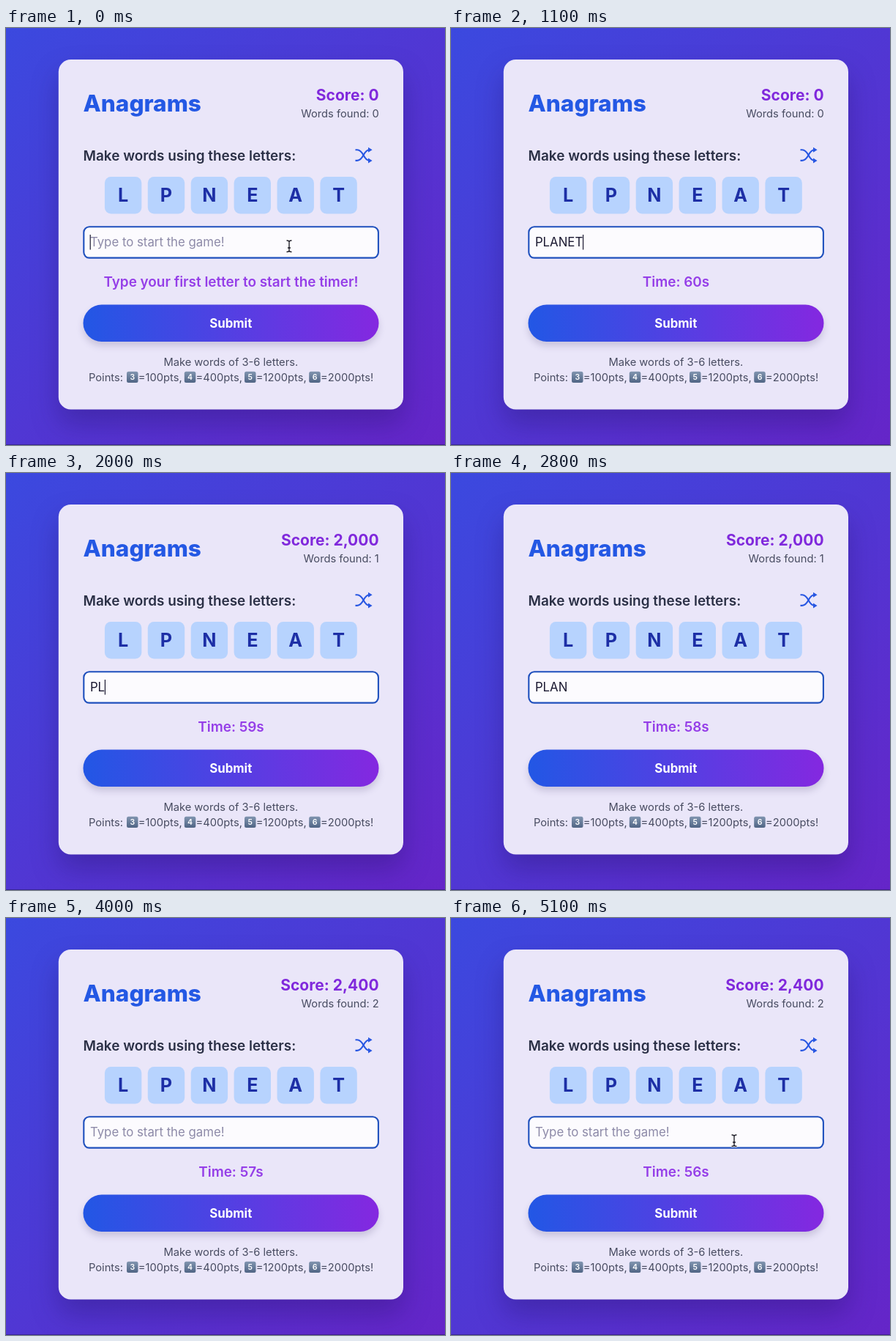
Recreate the animation shown at these times as an HTML page. Size 600 by 569 pixels, loop 5200 ms.

```html
<!DOCTYPE html>
<html lang="en">
<head>
<meta charset="utf-8">
<title>Anagrams</title>
<style>
  html, body { margin: 0; width: 100%; height: 100%; overflow: hidden; background: #4b37d3; }
  svg { display: block; width: 600px; height: 569px; font-family: Inter, sans-serif; }
  .card { filter: drop-shadow(0 20px 18px rgba(20, 5, 70, .26)); }
  .button { filter: drop-shadow(0 6px 5px rgba(30, 20, 80, .16)); }
  .mid { text-anchor: middle; }
  .end { text-anchor: end; }
  .small { font-size: 14.7px; fill: #484c61; }
  .score { font-size: 21px; font-weight: 700; fill: #8029dc; }
  .tile { font-size: 25.2px; font-weight: 700; fill: #1d2fa6; }
  .field { font-size: 16.8px; fill: #1a1830; }
</style>
</head>
<body>
<svg viewBox="0 0 600 569">
  <defs>
    <linearGradient id="page" x2="1" y2="1">
      <stop stop-color="#3b49df"/><stop offset="1" stop-color="#6525c8"/>
    </linearGradient>
    <linearGradient id="action">
      <stop stop-color="#2257e5"/><stop offset="1" stop-color="#8428e0"/>
    </linearGradient>
    <linearGradient id="keycap" x2="0" y2="1">
      <stop stop-color="#8195b0"/><stop offset="1" stop-color="#506585"/>
    </linearGradient>
  </defs>

  <rect width="600" height="569" fill="url(#page)"/>
  <rect y="568" width="600" height="1" fill="#20145c" opacity=".5"/>
  <rect class="card" x="71.8" y="43" width="471.2" height="477.5" rx="16.8" fill="#eae6f9"/>

  <text x="105.6" y="113.7" font-size="31.5" font-weight="800" fill="#2458e4">Anagrams</text>
  <text id="label" class="score end" y="99">Score:</text>
  <text id="score" class="score end" x="509.6" y="99"></text>
  <text id="found" class="small end" x="509.8" y="122"></text>

  <text x="105.6" y="180.5" font-size="18.9" font-weight="600" fill="#2b3046">Make words using these letters:</text>
  <g fill="none" stroke="#2857e2" stroke-width="2.1">
    <path d="M477.5 166.3h2.5c4.500 0 6.500 3.500 8.500 7.300s4 7.300 8 7.300"/>
    <path d="M477.500 180.900h2.500c4.500 0 6.500-3.500 8.500-7.300s4-7.300 8-7.300"/>
    <path d="M495 162.800l5.600 3.500-5.600 3.500zM495 177.400l5.600 3.500-5.600 3.500z" fill="#2857e2" stroke="none"/>
  </g>
  <g id="tiles"></g>

  <rect x="106.300" y="271.300" width="402.600" height="42.300" rx="7.500" fill="#fcfbfe" stroke="#1f50bd" stroke-width="2.100"/>
  <text id="entry" class="field" x="114.900" y="298.200"></text>
  <rect id="caret" y="282" width="1.200" height="20.500" fill="#1a1830"/>

  <text id="message" class="mid" x="307.500" y="352.600" font-size="18.9" font-weight="600" fill="#953ee8"></text>
  <rect class="button" x="105.500" y="377.500" width="404" height="50.400" rx="25.200" fill="url(#action)"/>
  <text class="mid" x="307.300" y="408.500" font-size="16.8" font-weight="700" fill="#fff">Submit</text>

  <text class="small mid" x="307.300" y="460.700">Make words of 3-6 letters.</text>
  <g id="points"><text class="small" x="113" y="481.700">Points:</text></g>

  <g id="pointer" fill="none" stroke-linecap="round">
    <path id="beam" d="M-3-7.500q2.500 0 3 1.500q.5-1.500 3-1.500M0-6V6.500M-3 8q2.500 0 3-1.500q.5 1.500 3 1.500M-1.500 2.500h3" stroke="#fff" stroke-width="2.800"/>
    <use href="#beam" style="stroke:#111"/>
    <path d="M-3-7.500q2.500 0 3 1.500q.5-1.500 3-1.500M0-6V6.500M-3 8q2.500 0 3-1.500q.5 1.500 3 1.500M-1.500 2.500h3" stroke="#15131f" stroke-width="1.300"/>
  </g>
</svg>
<script>
  const LOOP = 5200, STEP = 100, START = 200, POP = 500;
  const rounds = [
    { word: "PLANET", keys: [200, 300, 400, 500, 700, 800], submit: 1200, total: "2,000" },
    { word: "PLAN", keys: [1800, 2000, 2100, 2300], submit: 3300, total: "2,400" }
  ];
  const $ = id => document.getElementById(id);

  $("tiles").innerHTML = [..."LPNEAT"].map((letter, i) => {
    const x = 134.900 + i * 58.9;
    return `<rect x="${x}" y="203" width="50.400" height="50.400" rx="8.400" fill="#b7d3fe"/>
      <text class="tile mid" x="${x + 25.2}" y="237.300">${letter}</text>`;
  }).join("");

  $("points").innerHTML += [
    [165, 3, "=100pts,"], [243.800, 4, "=400pts,"], [326, 5, "=1200pts,"], [414.200, 6, "=2000pts!"]
  ].map(([x, size, text]) =>
    `<rect x="${x}" y="468.700" width="15.500" height="15.200" rx="2.500" fill="url(#keycap)"/>
     <text class="mid" x="${x + 7.8}" y="480.200" font-size="10.5" font-weight="600" fill="#fff">${size}</text>
     <text class="small" x="${x + 15.8}" y="481.700">${text}</text>`).join("");

  function mix(from, to, k) {
    return `rgb(${from.map((v, i) => Math.round(v + (to[i] - v) * k))})`;
  }

  function draw(t) {
    const done = rounds.filter(r => t >= r.submit);
    const last = done[done.length - 1];
    const current = rounds[done.length];
    const typed = current ? current.keys.filter(k => t >= k).length : 0;
    const lastAction = typed ? current.keys[typed - 1] : last ? last.submit : 0;

    // Score, with a short pop after each accepted word
    const score = $("score");
    score.textContent = last ? last.total : "0";
    const width = score.getComputedTextLength();
    const progress = last ? (t - last.submit) / POP : 1;
    const pop = progress < 1 ? Math.sin(Math.PI * progress) : 0;
    const cx = 509.6 - width / 2;
    score.setAttribute("transform", `translate(${cx} 91.300) scale(${1 + .09 * pop}) translate(${-cx} -91.300)`);
    score.style.fill = mix([128, 41, 220], [70, 30, 145], pop);
    $("label").setAttribute("x", 509.6 - width - 5);
    $("found").textContent = "Words found: " + done.length;

    // Input and blinking caret
    const entry = $("entry");
    entry.textContent = typed ? current.word.slice(0, typed) : "Type to start the game!";
    entry.style.fill = typed ? "#1a1830" : "#8d8aa8";
    $("caret").setAttribute("x", 114.6 + (typed ? entry.getComputedTextLength() : 0));
    $("caret").style.opacity = (t - lastAction) % 1000 < 500 ? 1 : 0;

    $("message").textContent = t < START
      ? "Type your first letter to start the timer!"
      : `Time: ${60 - Math.floor((t - START) / 1000)}s`;

    $("pointer").style.opacity = t < START || t >= 4900 ? 1 : 0;
    $("pointer").setAttribute("transform", `translate(387 ${t < START ? 297.5 : 303.5})`);
  }

  function tick() {
    const t = performance.now() % LOOP;
    draw(Math.floor(t / STEP) * STEP);
    requestAnimationFrame(tick);
  }
  tick();
</script>
</body>
</html>
```
